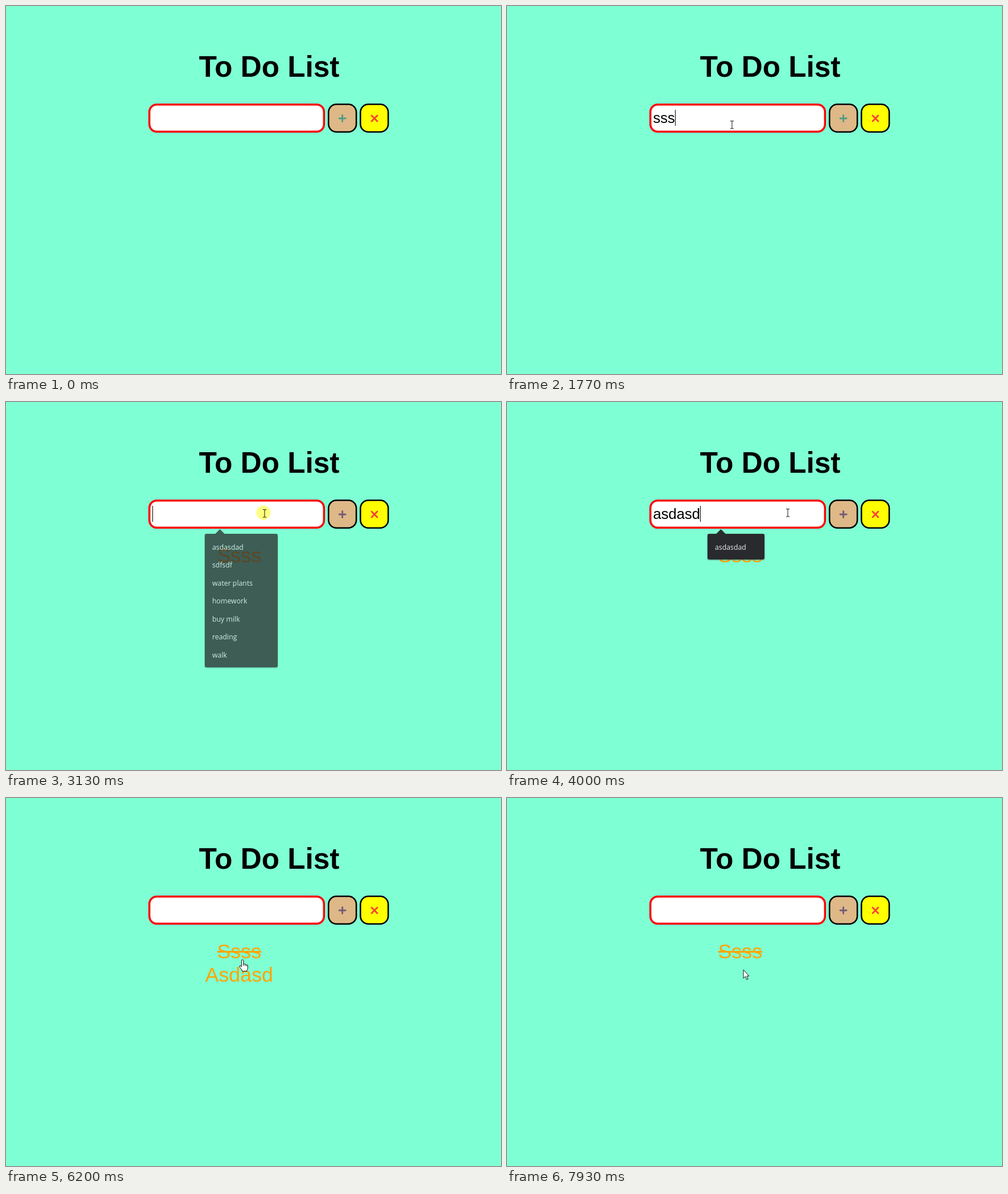
Animation of 869 by 645 pixels, one loop 8 s. Source, as an HTML page:

```html
<!DOCTYPE html>
<html lang="en">
<head>
<meta charset="utf-8">
<title>To Do List</title>
<style>
html, body { margin: 0; width: 100%; height: 100%; overflow: hidden; background: #7fffd4; }
svg { display: block; font-family: "Liberation Sans", Arial, sans-serif; }
.title { font-size: 51.2px; font-weight: bold; text-anchor: middle; }
.typed { font-size: 25.6px; }
.item { font-size: 35.84px; fill: #ffa500; text-anchor: middle; }
.popup { fill: #292a2d; filter: drop-shadow(0 1px 1px #0006); }
.popup text { font: 12.3px "Open Sans", sans-serif; fill: #e8eaed; }
.icon { fill: none; stroke-width: 2.8; stroke-linecap: round; }
.cursor { fill: #fff; stroke: #111; stroke-linejoin: round; }
.cursor .line { fill: none; }
</style>
</head>
<body>
<svg width="869" height="645" viewBox="0 0 869 645">
  <text class="title" x="462" y="124">To Do List</text>
  <rect x="251.7" y="172.7" width="306.6" height="47.6" rx="13" fill="#fff" stroke="red" stroke-width="3.5"/>
  <g stroke="#000" stroke-width="2.6">
    <rect x="566.2" y="172.3" width="48.8" height="48.4" rx="14" fill="#deb887"/>
    <rect x="622.2" y="172.3" width="48.8" height="48.4" rx="14" fill="#ff0"/>
  </g>
  <path id="plus" class="icon" d="M585 197h11m-5.5-5.5v11"/>
  <path class="icon" stroke="#f5413f" d="M641.8 192l10 10m0-10l-10 10"/>
  <g id="live"></g>
</svg>
<script>
const LOOP = 8000, HOLD = 140;
const live = document.getElementById('live');
const plus = document.getElementById('plus');

// pointer rests: arrive, leave, x, y
const rests = [
  [0, 230, 751, 593], [1030, 1650, 391.5, 208], [1770, 1850, 395, 208],
  [2270, 2400, 607, 198], [2520, 2650, 598, 198.5], [3010, 3840, 454, 195],
  [4000, 4060, 493, 194], [4640, 4800, 600, 183], [5400, 6130, 418, 268],
  [6200, 6260, 415.5, 283], [6480, LOOP, 415, 301]
];
const presses = [1030, 2240, 3040, 4640, 5530, 6600, 7340];

const tasks = [
  { text: 'ssss', open: 1090, type: 1380, gap: 190, add: 2380, strike: 5670, gone: LOOP },
  { text: 'asdasd', open: 3100, type: 3390, gap: 112, add: 4780, strike: 6740, gone: 7540 }
];
const history = ['asdasdad', 'sdfsdf', 'water plants', 'homework', 'buy milk', 'reading', 'walk'];

const shapes = {
  arrow: '<path d="M0 0v15l3.5-3.2 2.3 5.4 2.3-1L5.900 11H10z"/>',
  beam: '<path class="line" d="M-3-6.500h2L0-6l1-.5h2M0-6V6.500M-3 7h2l1-.5 1 .5h2"/>',
  hand: '<path d="M-2 12V2.200a1.700 1.700 0 0 1 3.400 0V8q2.600-1 3 .8 2.300-.8 2.800.8 1.800-.3 1.800 1.600V14' +
    'q0 3-1.500 4.500v2H-1V19l-4.300-5.800q-.8-2 .8-2.500 1 0 2.500 2.200z"/>' +
    '<path class="line" d="M1.400 8v3m3-2v2.500m2.800-1.500v2"/>'
};

// advance widths of the few letters used
const textWidth = (text, size) =>
  size * [...text].reduce((w, c) => w + (c === 's' ? .5 : c < 'a' ? .667 : .556), 0);

function pointerAt(t) {
  const i = rests.findIndex(r => t < r[1]);
  const [arrive, , x, y] = rests[i];
  if (t >= arrive) return [x, y];
  const [, leave, x0, y0] = rests[i - 1];
  const k = (t - leave) / (arrive - leave);
  const ease = k * k * (3 - 2 * k);
  return [x0 + (x - x0) * ease, y0 + (y - y0) * ease];
}

function drawItem({ text, add, strike, gone }, row, t) {
  if (t < add || t >= gone) return '';
  const label = text[0].toUpperCase() + text.slice(1);
  const y = 281 + row * 41, w = textWidth(label, 35.84);
  const line = t < strike ? '' :
    `<path d="M${409.5 - w / 2} ${y - 11.5}h${w}" stroke="#ffa500" stroke-width="3.2"/>`;
  return `<text class="item" x="409.3" y="${y}">${label}</text>${line}`;
}

function drawPopup(rows, opacity) {
  if (!rows.length) return '';
  const [x, w] = rows.length > 1 ? [349, 128] : [352, 100];
  const labels = rows.map((s, i) => `<text x="${x + 13}" y="${258.5 + i * 31.5}">${s}</text>`);
  return `<g class="popup" opacity="${opacity}">
    <path d="M367 231.5l8.5-8.5 8.5 8.5z"/>
    <rect x="${x}" y="231" width="${w}" height="${13.5 + rows.length * 31.5}" rx="3"/>
    ${labels.join('')}</g>`;
}

function drawInput({ text, open, type, gap }, t, inField) {
  const typed = t < type ? '' : text.slice(0, 1 + Math.floor((t - type) / gap));
  const caret = Math.round(256.5 + textWidth(typed, 25.6)) + .5;
  const rows = inField ? history.filter(s => s.startsWith(typed)) : [];
  return `<text class="typed" x="256.5" y="205">${typed}</text>
    <path d="M${caret} 182v28" stroke="#000"/>` +
    drawPopup(rows, Math.min(1, .5 + (t - open) / 120));
}

function draw(t) {
  const [x, y] = pointerAt(t);
  const inBar = y > 171 && y < 222;
  const inField = inBar && x > 250 && x < 560;
  const onButton = inBar && x > 565;
  const onItem = t > tasks[1].add && t < 7930 && y > 248 && x < 470;
  const kind = inField ? 'beam' : onButton || onItem ? 'hand' : 'arrow';

  const editing = tasks.find(task => t >= task.open && t < task.add);
  const pressed = presses.some(p => t >= p && t < p + HOLD);

  plus.setAttribute('stroke', t < tasks[0].add ? '#4f9b88' : '#735a78');
  live.innerHTML = tasks.map((task, row) => drawItem(task, row, t)).join('') +
    (editing ? drawInput(editing, t, inField) : '') +
    (pressed ? `<circle cx="${x - 2}" cy="${y + (inField ? -1 : 4)}" r="12.5" fill="#ff0" opacity=".5"/>` : '') +
    (t < 230 ? '' : `<g class="cursor" transform="translate(${x} ${y})">${shapes[kind]}</g>`);
}

const start = performance.now();
function tick() {
  draw((performance.now() - start) % LOOP);
  requestAnimationFrame(tick);
}
tick();
</script>
</body>
</html>
```
